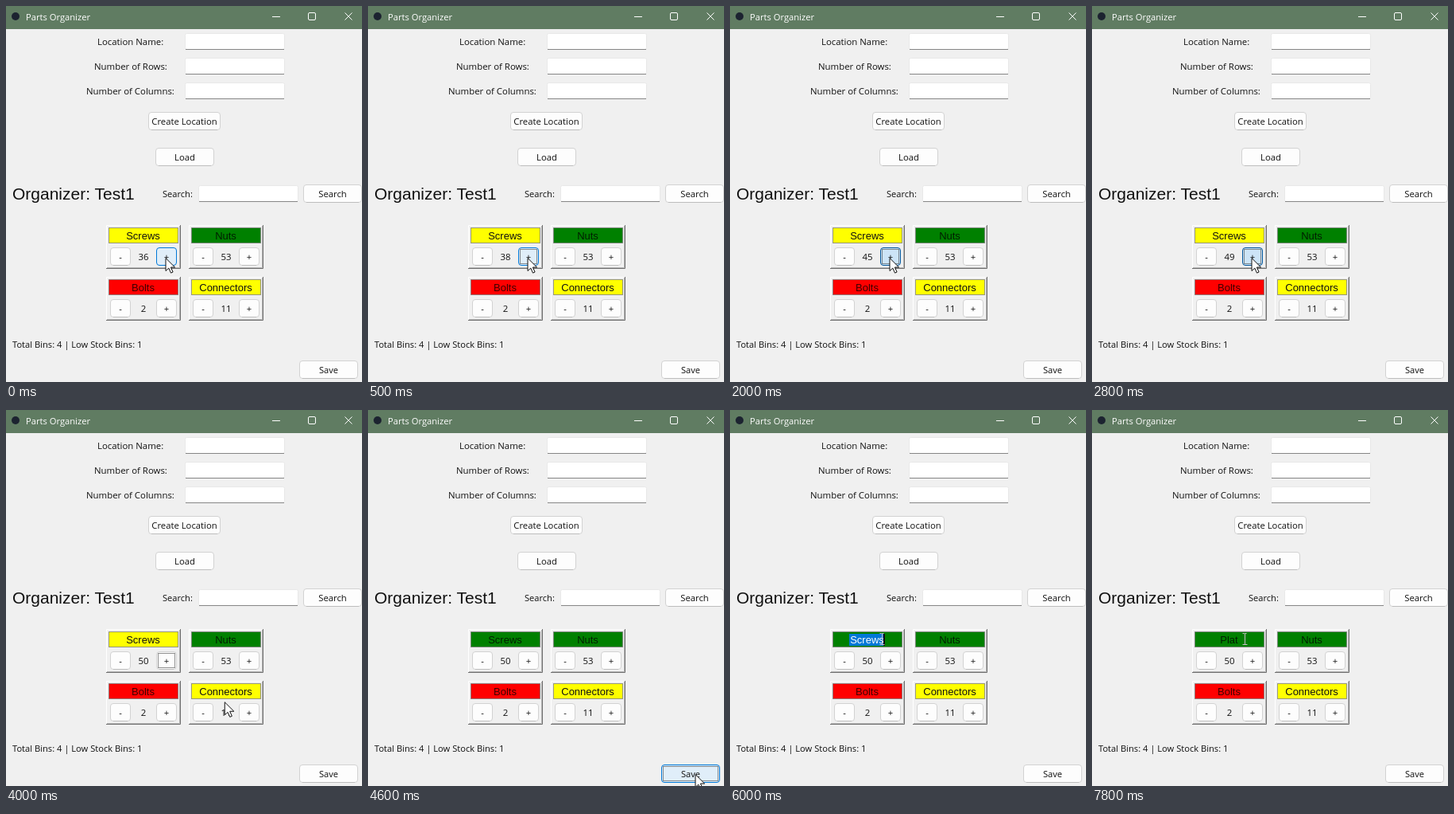
Recreate the animation shown at these times as an HTML page. Size 448 by 472 pixels, loop 8000 ms.

```html
<!DOCTYPE html>
<html lang="en">
<head>
<meta charset="utf-8">
<title>Parts Organizer</title>
<style>
  html, body { margin: 0; width: 100%; height: 100%; overflow: hidden; background: #f0f0f0; }
  svg { display: block; width: 448px; height: 472px; }
  .ui { font-family: "Open Sans", "Noto Sans", sans-serif; }
  .arial { font-family: "Liberation Sans", Arial, sans-serif; }
</style>
</head>
<body>
<svg id="stage" viewBox="0 0 448 472"></svg>
<script>
const LOOP = 8000, STEP = 100;
const stage = document.getElementById('stage');

// Times at which the Screws counter goes up, starting from 36
const CLICKS = [200, 400, 600, 800, 1000, 1100, 1300, 1500, 2000, 2200, 2400, 2600, 2800, 3100];
const POINTER = [[0, 201, 316], [3500, 201, 316], [3600, 201, 317], [3800, 201, 317],
                 [4300, 412, 457], [5000, 412, 457], [5600, 191, 287]];
const LOOKS = {
  normal:  ['#fdfdfd', '#d2d2d2'],
  hover:   ['#e0eef9', '#0078d7'],
  pressed: ['#cce4f7', '#005499']
};

const rect = (x, y, w, h, fill, more = '') =>
  `<rect x="${x}" y="${y}" width="${w}" height="${h}" fill="${fill}" ${more}/>`;
const path = (d, stroke, more = '') => `<path d="${d}" fill="none" stroke="${stroke}" ${more}/>`;
const text = (s, x, y, { size = 11.4, cls = 'ui', fill = '#111', anchor = 'start' } = {}) =>
  `<text x="${x}" y="${y}" class="${cls}" font-size="${size}" fill="${fill}" text-anchor="${anchor}">${s}</text>`;
const between = (t, a, b) => t >= a && t < b;

function button(label, x, y, w, h, { look = 'normal', focus = false, size = 11.3 } = {}) {
  const [fill, edge] = LOOKS[look];
  return rect(x + .5, y + .5, w - 1, h - 1, fill, `rx="3.5" stroke="${edge}"`) +
    (look === 'normal' ? path(`M${x + 4} ${y + h - .5}h${w - 8}`, '#bdbdbd') : '') +
    (focus ? rect(x + 2.5, y + 2.5, w - 5, h - 5, 'none', 'stroke="#222" stroke-dasharray="1 1"') : '') +
    text(label, x + w / 2, y + h / 2 + 4, { anchor: 'middle', size });
}

function entry(x, y, w) {
  return rect(x + .5, y + .5, w - 1, 20, '#fff', 'rx="2" stroke="#e8e8e8"') +
    path(`M${x + 1} ${y + 20.5}h${w - 2}`, '#868686');
}

function bin(x, y, name, count, color, { plus, overlay = '' } = {}) {
  const ink = color === '#ff0' ? '#111' : 'rgba(0,0,0,.76)';
  return path(`M${x + .5} ${y + 55}V${y + .5}H${x + 94}`, '#fff') +
    path(`M${x + 1} ${y + 53.5}H${x + 92.5}V${y + 1}`, '#b4b4b4') +
    path(`M${x} ${y + 54.5}H${x + 93.5}V${y}`, '#707070') +
    rect(x + 3.5, y + 3.5, 87, 19, color, 'stroke="#777" stroke-opacity=".75"') +
    (overlay || text(name, x + 46.5, y + 18, { cls: 'arial', size: 13, fill: ink, anchor: 'middle' })) +
    button('-', x + 5, y + 28, 26, 23) +
    text(count, x + 47, y + 44, { anchor: 'middle' }) +
    button('+', x + 63, y + 28, 26, 23, plus);
}

function pointerAt(t) {
  const i = POINTER.findIndex(p => p[0] > t);
  if (i < 0) return POINTER.at(-1).slice(1);
  const [t0, x0, y0] = POINTER[i - 1], [t1, x1, y1] = POINTER[i];
  const k = (t - t0) / (t1 - t0), e = k * k * (3 - 2 * k);
  return [x0 + (x1 - x0) * e, y0 + (y1 - y0) * e];
}

function pointer(t) {
  if (t >= 5600) {
    const x = t < 7100 ? 191 : 192;
    return path(`M${x - 2.5} 280.5h2l.5 .5 .5-.5h2M${x + .5} 281V294M${x - 2.5} 294.5h6`, '#c9bcc8');
  }
  const [x, y] = pointerAt(t);
  return `<path transform="translate(${x} ${y})" d="M0 .5V16.5l3.8-3.4 2.7 6 2.6-1.1-2.7-6h5.2z" fill="#fff" stroke="#111"/>`;
}

function screws(t) {
  const count = 36 + CLICKS.filter(c => c <= t).length;
  const down = CLICKS.some(c => between(t, c, c + 100)) && t < 3100 || between(t, 2800, 3100);
  const plus = {
    look: down ? 'pressed' : t < 3900 ? 'hover' : 'normal',
    focus: between(t, 200, 4500)
  };
  const name = t < 7300 ? 'Screws' : 'Plat'.slice(0, t < 7400 ? 1 : t < 7500 ? 2 : t < 7800 ? 3 : 4);
  const selected = between(t, 5700, 7300);
  const overlay = selected ? rect(150, 281, 44, 15, '#0078d7') +
    text(name, 172.5, 293, { cls: 'arial', size: 13, fill: '#fff', anchor: 'middle' }) : '';
  const caret = between(t, 5700, 6400) || between(t, 6700, 7100) || between(t, 7300, 7800);
  const caretX = selected ? 193 : 173 + [4, 6, 9][name.length - 1];
  return bin(126, 275, name, count, t < 4600 ? '#ff0' : '#008000', { plus, overlay }) +
    (caret ? rect(caretX, 281, 2, 15, '#111') : '');
}

function titleBar() {
  return rect(0, 0, 448, 29, '#607c62') +
    '<circle cx="12" cy="13" r="5" fill="#1c2330"/>' +
    text('Parts Organizer', 25, 18, { size: 11.2, fill: '#fff' }) +
    path('M335 13.5h10M426.5 8.5l9 9m0-9l-9 9', '#fff') +
    rect(380.5, 8.5, 9, 9, 'none', 'rx="1.5" stroke="#fff"');
}

const fixed = rect(0, 0, 448, 472, '#f0f0f0') + titleBar() +
  [['Location Name:', 115], ['Number of Rows:', 111], ['Number of Columns:', 101]]
    .map(([s, x], i) => text(s, x, 49 + 31 * i) + entry(225, 34 + 31 * i, 126)).join('') +
  button('Create Location', 179, 133, 91, 23) +
  button('Load', 188, 178, 74, 23) +
  text('Organizer: Test1', 8, 243, { cls: 'arial', size: 21 }) +
  text('Search:', 197, 240, { size: 11.1 }) + entry(242, 225, 126) +
  button('Search', 374, 224, 74, 23) +
  bin(230, 275, 'Nuts', 53, '#008000') +
  bin(126, 340, 'Bolts', 2, '#f00') +
  bin(230, 340, 'Connectors', 11, '#ff0') +
  text('Total Bins: 4 | Low Stock Bins: 1', 8, 429, { size: 11.15 });

function scene(t) {
  const save = {
    look: between(t, 4500, 4600) ? 'pressed' : between(t, 4300, 5200) ? 'hover' : 'normal',
    focus: between(t, 4500, 5700),
    size: 11.1
  };
  return fixed + screws(t) + button('Save', 369, 445, 74, 23, save) + pointer(t);
}

let shown = -1;
function frame() {
  const t = Math.floor(performance.now() % LOOP / STEP) * STEP;
  if (t !== shown) stage.innerHTML = scene(shown = t);
  requestAnimationFrame(frame);
}
frame();
</script>
</body>
</html>
```
